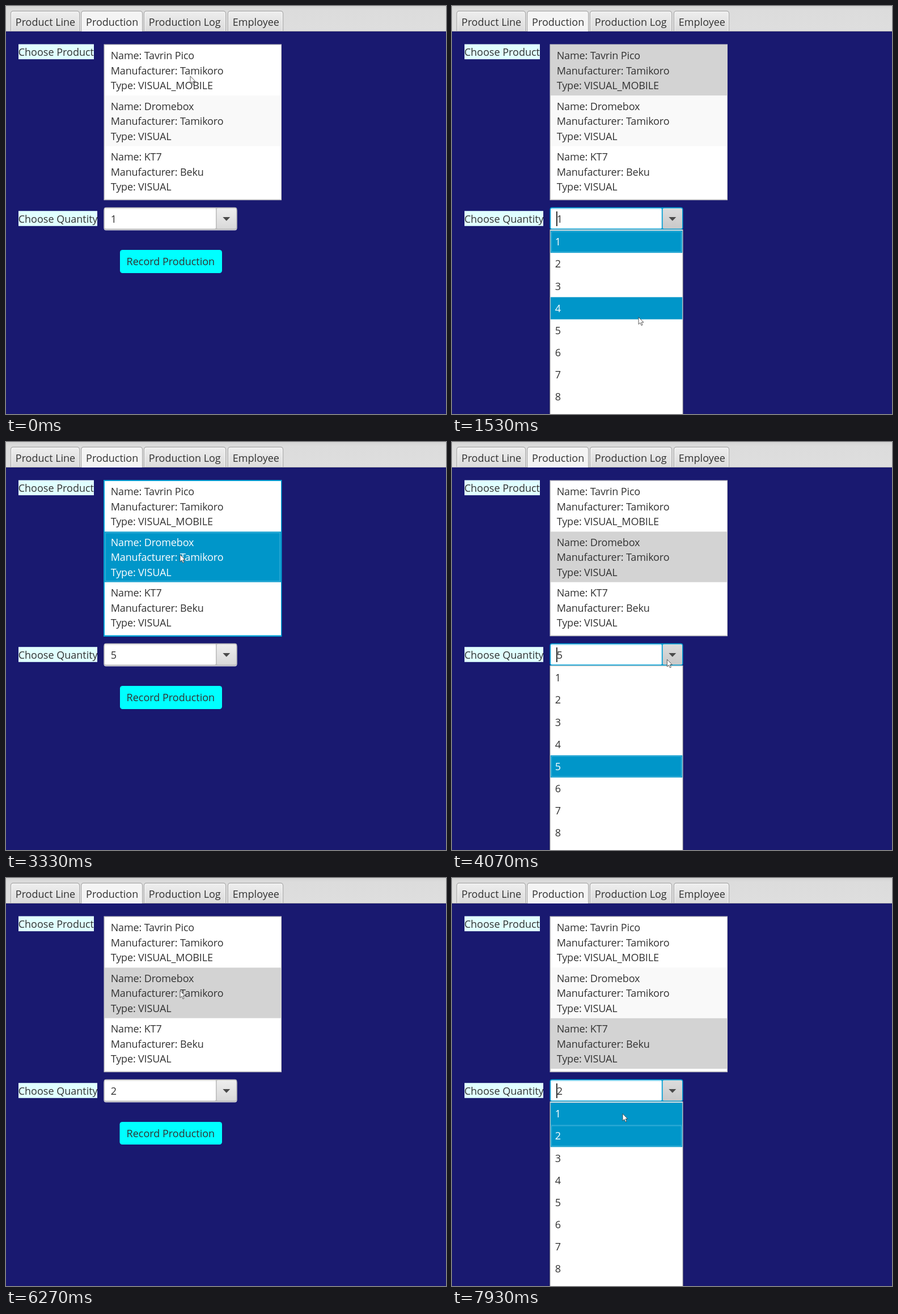
Recreate the animation shown at these times as an HTML page. Size 776 px wide and 721 px high, loop 8 s.

```html
<!DOCTYPE html>
<html lang="en">
<head>
<meta charset="utf-8">
<title>Production</title>
<style>
  html, body { margin: 0; width: 100%; height: 100%; overflow: hidden; background: #191970; }
  svg { display: block; font: 18px "Open Sans", "Noto Sans", sans-serif; }
  .list { letter-spacing: -.15px; }
</style>
</head>
<body>
<svg id="stage" width="776" height="721" viewBox="0 0 776 721">
  <defs>
    <linearGradient id="header" x2="0" y2="1">
      <stop stop-color="#d4d4d4"/><stop offset=".15" stop-color="#dcdcdc"/><stop offset="1" stop-color="#dedede"/>
    </linearGradient>
    <linearGradient id="grey" x2="0" y2="1"><stop stop-color="#eeeeee"/><stop offset="1" stop-color="#d9d9d9"/></linearGradient>
    <linearGradient id="light" x2="0" y2="1"><stop stop-color="#f8f8f8"/><stop offset="1" stop-color="#e5e5e5"/></linearGradient>
    <linearGradient id="dark" x2="0" y2="1"><stop stop-color="#dcdcdc"/><stop offset="1" stop-color="#c9c9c9"/></linearGradient>
  </defs>
  <g id="tabs"></g>
  <g id="scene"></g>
  <path id="cursor" d="M0 0V12.6L2.9 9.9 5 14.6 7 13.7 5 9.2H8.9Z" fill="#fff" stroke="#333" stroke-width=".8"/>
</svg>
<script>
const INK = '#323232', BLUE = '#0096c9', FOCUS = '#039ed3', RING = '#45b5dc', EDGE = '#bcbcbc';
const LOOP = 8000, ITEM = 39.17, MENU_TOP = 397, ROW = 89.4, LINE = 26.6;
const $ = id => document.getElementById(id);

const products = [
  ['Tavrin Pico', 'Tamikoro', 'VISUAL_MOBILE'],
  ['Dromebox', 'Tamikoro', 'VISUAL'],
  ['KT7', 'Beku', 'VISUAL'],
];
const fields = ['Name', 'Manufacturer', 'Type'];

// Where the pointer rests on each control
const spots = {
  product: i => [325 - 18 * i, 124 + 75 * i],
  arrow: () => [389, 375],
  item: n => [296 + 5 * n, MENU_TOP + (n - .5) * ITEM],
  button: () => [316, 460],
  field: () => [335, 380],
  aside: () => [437, 429],
};

// What a click on each control does
const effects = {
  product: (s, i) => { s.focus = 'list'; s.row = i; },
  arrow: (s, _, time) => { s.focus = 'combo'; s.open = true; s.since = time; },
  item: (s, n) => { s.open = false; s.amount = n; },
  button: s => { s.focus = 'button'; },
};

// Pointer visits: control, its number, leave, arrive, click (if any)
const visits = [
  ['product', 0, 0, 0, 200],
  ['arrow', 0, 330, 930, 1200],
  ['item', 5, 1200, 1620, 1870],
  ['button', 0, 1870, 2200, 2530],
  ['product', 1, 2730, 3330, 3330],
  ['arrow', 0, 3400, 3800, 4000],
  ['item', 2, 4000, 4330, 4470],
  ['button', 0, 4400, 4530],
  ['field', 0, 4670, 4930],
  ['button', 0, 4930, 5130, 5270],
  ['product', 2, 5400, 5930],
  ['product', 1, 6200, 6270],
  ['product', 2, 6330, 6670, 6730],
  ['aside', 0, 6800, 7070],
  ['arrow', 0, 7070, 7530, 7730],
  ['item', 1, 7730, 7930],
];

const spot = ([kind, n]) => spots[kind](n);
const rect = (x, y, w, h, fill, more = '') =>
  `<rect x="${x}" y="${y}" width="${w}" height="${h}" fill="${fill}" ${more}/>`;
const text = (x, y, s, fill = INK) => `<text x="${x}" y="${y}" fill="${fill}">${s}</text>`;
const ring = (x, y, w, h) => rect(x, y, w, h, 'none', `stroke="${RING}"`);

function pointer(t) {
  const i = visits.findLastIndex(v => v[2] <= t);
  const [, , leave, arrive] = visits[i];
  const from = spot(visits[Math.max(0, i - 1)]), to = spot(visits[i]);
  const k = Math.min(1, (t - leave) / (arrive - leave) || 0);
  const ease = k * k * (3 - 2 * k);
  return from.map((a, j) => a + (to[j] - a) * ease);
}

function stateAt(t) {
  const state = { focus: '', row: -1, amount: 1, open: false, since: 0 };
  for (const [kind, n, , , click] of visits)
    if (click <= t) effects[kind](state, n, click);
  return state;
}

function tab(x, w, label, active) {
  return rect(x + .5, 9, w - 1, 40, active ? '#f4f4f4' : 'url(#grey)', 'rx="4" stroke="#b0b0b0" stroke-width="1.4"')
    + rect(x + 2, 10.5, w - 4, 36, 'none', 'rx="3" stroke="#fff" stroke-opacity=".7"')
    + text(x + 8.8, 34.7, label);
}

function list(row, focused) {
  let out = focused ? rect(172, 67, 314.5, 277, FOCUS) : rect(172.5, 67.5, 313.5, 275.7, '#c8c8c8');
  out += rect(174, 69, 311, 272.5, '#fff');
  products.forEach((product, i) => {
    const on = i === row, y = 69 + i * ROW, hot = on && focused;
    const fill = hot ? BLUE : on ? '#d3d3d3' : i % 2 ? '#f9f9f9' : '#fff';
    out += rect(174, y, 311, ROW, fill);
    if (hot) out += ring(175.5, y + 2, 307.5, ROW - 4);
    fields.forEach((field, j) => {
      out += text(184.7, 94.2 + i * ROW + j * LINE, `${field}: ${product[j]}`, hot ? '#fff' : INK);
    });
  });
  return `<g class="list">${out}</g>`;
}

function combo(amount, focused, open, hover, caret) {
  const face = open ? 'dark' : hover ? 'light' : 'grey';
  return (focused ? '' : rect(172.5, 358, 235, 38.6, '#d4d4dc', 'rx="4"'))
    + rect(172.5, 355.8, 235, 39.4, focused ? FOCUS : EDGE, 'rx="4"')
    + rect(174, 357.4, 196, 36, focused ? '#dff3fa' : '#fff', 'rx="2"')
    + (focused ? rect(176, 360, 192, 31.5, '#fff', 'rx="2"') : rect(174, 357.4, 196, 1.5, '#ececec'))
    + rect(371.6, 357.4, 34.4, 36, `url(#${face})`, 'rx="2"')
    + `<path d="M382.3 373h13l-6.5 6.8z" fill="#4a4a4a"/>`
    + text(184.8, 382.6, amount)
    + (caret ? rect(184, 363, 1.7, 26, '#111') : '');
}

function menu(amount, hover) {
  let out = rect(171, 396, 237.5, 340, '#000', 'opacity=".18"')
    + rect(172.5, 395, 235, 340, '#c8c8c8') + rect(173.8, 396.3, 232.4, 340, '#fff');
  for (let i = 0; i < 9; i++) {
    const y = MENU_TOP + i * ITEM, on = i === amount - 1, hot = on || i === hover;
    if (hot) out += rect(173.8, y, 232.4, ITEM, BLUE);
    if (on) out += ring(175.5, y + 1.7, 229, ITEM - 3.4);
    out += text(181.7, y + 26.3, i + 1, hot ? '#fff' : INK);
  }
  return out;
}

function draw(t) {
  const [x, y] = pointer(t);
  const { focus, row, amount, open, since } = stateAt(t);
  const overCombo = x > 172 && x < 408 && y > 356 && y < 396;
  const caret = focus === 'combo' && (t - since) % 1000 < 500;
  const lift = focus === 'button' ? 1 : 0;

  $('scene').innerHTML = rect(22, 67.5, 133, 26.6, '#e0ffff') + text(21.7, 88, 'Choose Product')
    + rect(22, 362.2, 139, 26.6, '#e0ffff') + text(21.7, 382.7, 'Choose Quantity')
    + list(row, focus === 'list')
    + combo(amount, focus === 'combo', open, overCombo, caret)
    + rect(201 - lift / 2, 431, 180 + lift / 2, 41 - lift, '#0ff', 'rx="4.5"')
    + text(212.6, 458, 'Record Production')
    + (open ? menu(amount, Math.floor((y - MENU_TOP) / ITEM)) : '');
  $('cursor').setAttribute('transform', `translate(${x} ${y})`);
}

$('tabs').innerHTML = rect(0, 0, 776, 45, 'url(#header)')
  + tab(8, 122, 'Product Line') + tab(243, 145, 'Production Log') + tab(391, 98, 'Employee')
  + rect(0, 44, 776, 1, '#b5b5b5')
  + tab(132.3, 108.7, 'Production', true)
  + rect(0, 45, 776, 676, '#191970');

const start = performance.now();
let shown = -1;
function tick() {
  const now = (performance.now() - start) % LOOP;
  const step = Math.floor((now + 5) * .015) % 120;
  if (step !== shown) draw(Math.round(step / .15) * 10);
  shown = step;
  requestAnimationFrame(tick);
}
tick();
</script>
</body>
</html>
```
